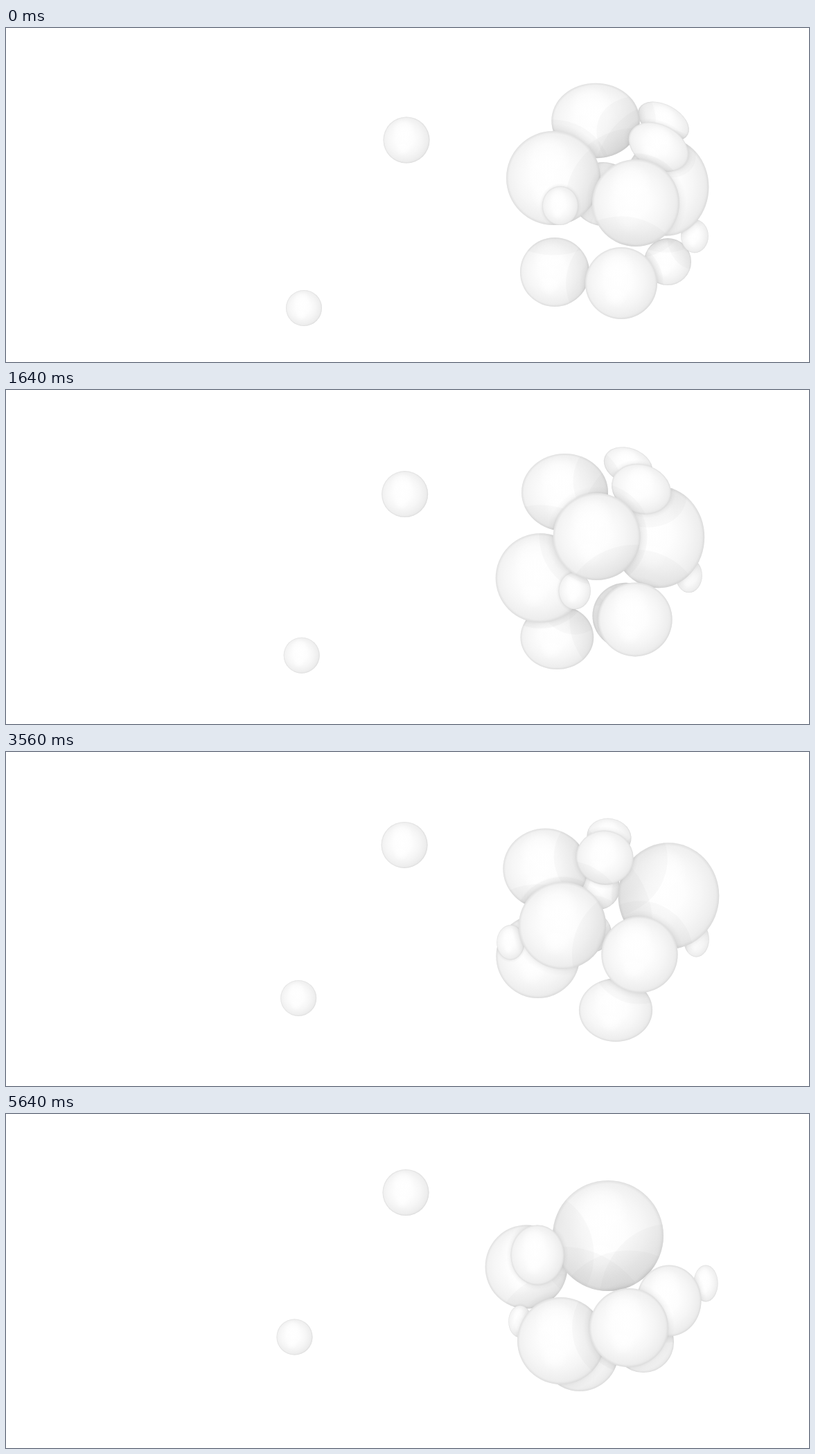
Recreate the animation shown at these times as an HTML page with a canvas. Size 1159 by 483 pixels, loop 5680 ms.

```html
<!DOCTYPE html>
<html lang="en">
<head>
<meta charset="utf-8">
<title>Floating spheres</title>
<style>
  html, body { margin: 0; width: 100%; height: 100%; overflow: hidden; background: #fff; }
  canvas { display: block; }
</style>
</head>
<body>
<canvas id="stage" width="1159" height="483"></canvas>
<script>
const ctx = document.getElementById('stage').getContext('2d');
const LOOP = 5680, STEP = 40;
const TAU = 2 * Math.PI;
const balls = [];

// Smooth polynomial through evenly spaced points, u from 0 to 1.
function curve(points, u) {
  const s = u * (points.length - 1);
  return points.reduce((sum, p, i) =>
    sum + points.reduce((w, _, j) => j === i ? w : w * (s - j) / (i - j), p), 0);
}

// Radius, x and y follow curves; squash flattens (or, below 0, lengthens) the ball.
const ball = (r, x, y, squash = [0], tilt = 0) => balls.push({ r, x, y, squash, tilt });

// Back to front.
ball([46, 24], [862, 852, 870], [240, 200, 200]);
ball([32, 28], [949, 877, 880], [135, 112, 190], [.25, 0], .5);
ball([34, 46, 27, 44], [955, 885, 845, 920], [338, 318, 258, 330]);
ball([22, 22], [994, 985, 992, 1000, 1010], [301, 276, 254, 292, 245], [-.1, -.2]);
ball([59, 60], [851, 802, 776, 751], [134, 150, 172, 221], [.08, -.01]);
ball([66, 80], [953, 944, 955, 869], [230, 212, 207, 176], [-.07, 0]);
ball([50, 49], [792, 803, 890, 957], [353, 361, 371, 270], [0, .07, .07, -.05]);
ball([68, 56], [790, 769, 770, 828], [217, 276, 298, 345]);
ball([27, 20], [800, 812, 720, 742], [257, 290, 274, 300], [-.04, -.16]);
ball([39, 41], [942, 912, 857, 767], [172, 142, 156, 204], [.18, -.06], .5);
ball([63], [909, 845, 800, 801], [253, 213, 258, 328]);
ball([52, 57], [888, 910, 914, 899], [369, 326, 291, 309]);
ball([33.5], [578, 575, 577], [162, 141, 113.5]);
ball([26], [430, 424, 416.5], [405, 367, 322.5]);

function pose(b, u) {
  const r = curve(b.r, u), q = curve(b.squash, u);
  return { x: curve(b.x, u), y: curve(b.y, u), r, rx: r * (1 + q), ry: r * (1 - q), tilt: b.tilt * (1 - u) };
}

// Stops are [offset, gray level, alpha].
function glow(x, y, r, ...stops) {
  const g = ctx.createRadialGradient(x, y, 0, x, y, r);
  for (const [offset, level, alpha] of stops) g.addColorStop(offset, `rgba(${level},${level},${level},${alpha})`);
  return g;
}

function disc(r, fill) {
  ctx.beginPath();
  ctx.arc(0, 0, r, 0, TAU);
  ctx.fillStyle = fill;
  ctx.fill();
}

// Runs draw() in the unit space of a ball.
function inside(b, draw) {
  ctx.save();
  ctx.translate(b.x, b.y);
  ctx.rotate(b.tilt);
  ctx.scale(b.rx, b.ry);
  draw();
  ctx.restore();
}

// Darkens only what is already painted behind the ball.
function shadow(b) {
  ctx.globalCompositeOperation = 'source-atop';
  inside(b, () => disc(1.16, glow(0, 0, 1.16, [.84, 110, .14], [.91, 120, .05], [1, 120, 0])));
  ctx.globalCompositeOperation = 'source-over';
}

function body(b) {
  inside(b, () => {
    disc(1, glow(-.08, -.06, 1.1, [0, 255, 1], [.35, 253, 1], [.65, 246, 1], [.88, 238, 1], [1, 230, 1]));
    disc(1, glow(-.12, -.42, .5, [0, 255, .8], [.6, 255, .5], [1, 255, 0]));
    disc(1, glow(-.15, .34, .34, [0, 255, .8], [.5, 255, .5], [1, 255, 0]));
    disc(1, glow(0, 0, 1, [.94, 210, 0], [1, 208, .5]));
  });
}

// A nearby ball in front is mirrored; the mirror image reaches part of the way to the centre.
function reflect(b, f) {
  const gap = Math.hypot(b.x - f.x, b.y - f.y);
  if (gap > (b.r + f.r) * 1.18 || f.r < b.r * .5) return;
  const reach = .82 * gap / f.r;
  ctx.save();
  ctx.beginPath();
  ctx.ellipse(b.x, b.y, b.rx, b.ry, b.tilt, 0, TAU);
  ctx.clip();
  inside(f, () => disc(reach, glow(0, 0, reach, [.7, 140, .09], [1, 150, .05])));
  ctx.restore();
}

function render(t) {
  ctx.clearRect(0, 0, 1159, 483);
  const scene = balls.map(b => pose(b, t / (LOOP - STEP)));
  scene.forEach((b, i) => {
    shadow(b);
    body(b);
    scene.slice(i + 1).forEach(f => reflect(b, f));
  });
}

let start;
function tick(now) {
  start ??= now;
  render(Math.floor((now - start) % LOOP / STEP) * STEP);
  requestAnimationFrame(tick);
}
requestAnimationFrame(tick);
</script>
</body>
</html>
```
